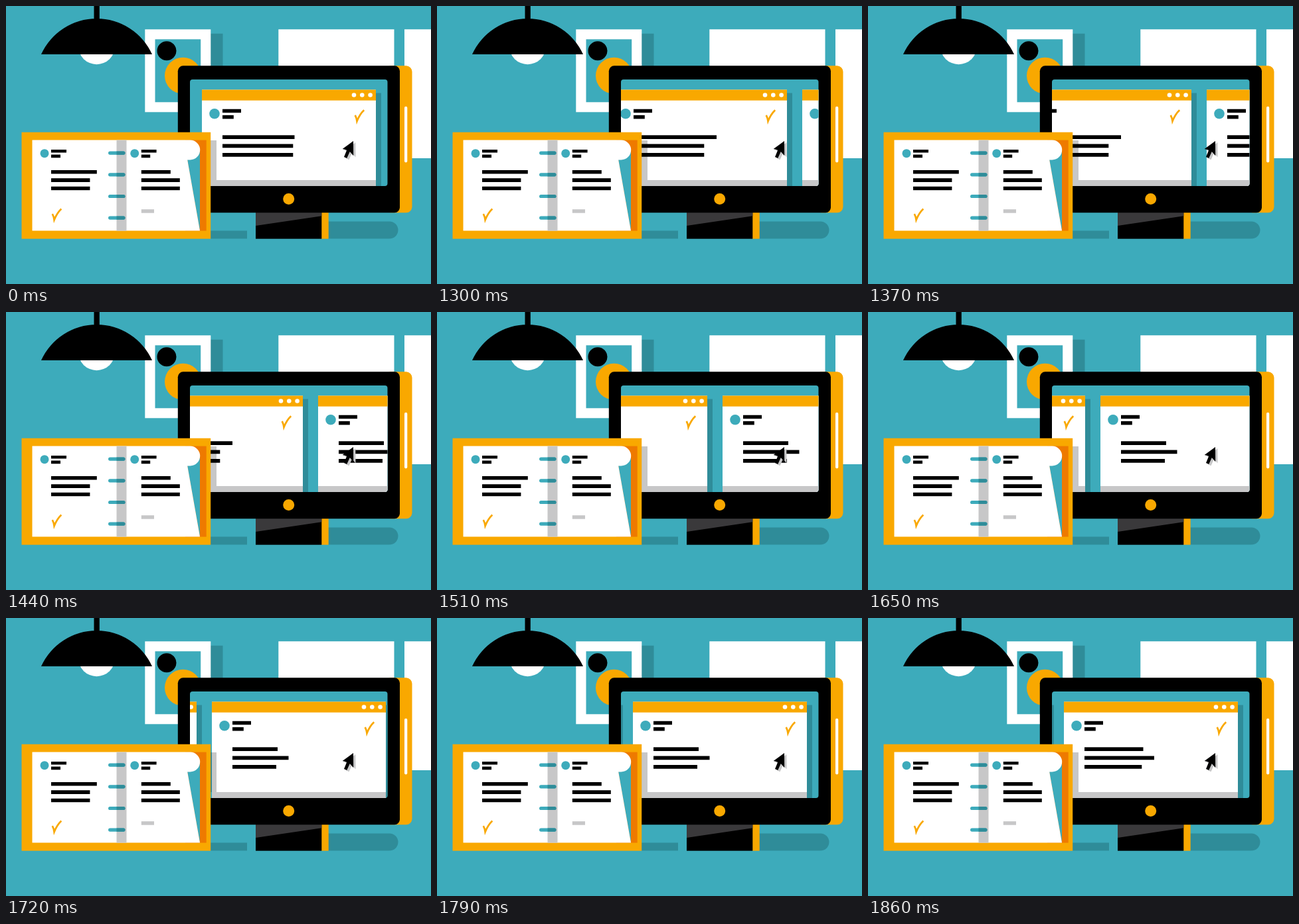
Write an HTML page that moves like this. It is 640 px wide and 420 px high and loops after 1.93 s.

```html
<!DOCTYPE html>
<html lang="en">
<head>
<meta charset="utf-8">
<title>Notebook and monitor</title>
<style>
  html, body { margin: 0; width: 100%; height: 100%; overflow: hidden; background: #3dabbb; }
  svg { display: block; width: 640px; height: 420px; }
  .teal { fill: #3dabbb; }
  .dark { fill: #2f8c99; }
  .orange { fill: #f9a800; }
  .white { fill: #fff; }
  .gray { fill: #c7c7c8; }
  .check { fill: none; stroke: #f9a800; stroke-width: 2.7; }
</style>
</head>
<body>
<svg viewBox="0 0 640 420">
  <defs>
    <clipPath id="screen"><rect x="277" y="111" width="297.5" height="161" rx="4"/></clipPath>
    <path id="check" class="check" d="M1 8.5Q3 12 3.8 17.5Q8 7 14.5 .8"/>
    <path id="arrow" d="M0 0L-16.3 12L-9.8 13.7L-14 24L-9.8 26L-5.2 16L.2 22.3Z"/>
    <g id="window">
      <rect class="dark" x="303" y="131.500" width="262" height="141"/>
      <rect class="white" x="295" y="126.500" width="262" height="146"/>
      <rect class="orange" x="295" y="126.500" width="262" height="16.200"/>
      <rect class="gray" x="295" y="263" width="262" height="9"/>
      <g class="white">
        <circle cx="524" cy="134.500" r="3.300"/>
        <circle cx="536.300" cy="134.500" r="3.300"/>
        <circle cx="548.600" cy="134.500" r="3.300"/>
      </g>
      <circle class="teal" cx="314" cy="162.700" r="7.800"/>
      <path d="M326 155.700h28v5.500h-28zM326 165h16.800v5.500h-16.800z"/>
      <use href="#check" x="524.700" y="156.500"/>
    </g>
    <g id="ring">
      <rect class="teal" x="154" width="25.500" height="5.200" rx="2.600"/>
      <path class="dark" d="M166.500 0h10.400a2.600 2.600 0 0 1 0 5.200h-10.400z"/>
    </g>
  </defs>

  <rect class="teal" width="640" height="420"/>

  <!-- wall -->
  <rect class="dark" x="308" y="41.700" width="18.500" height="60"/>
  <rect class="white" x="209.300" y="35.300" width="99" height="125"/>
  <rect class="teal" x="224.500" y="50.300" width="68.700" height="95"/>
  <circle class="orange" cx="266.500" cy="105.200" r="27.500"/>
  <circle cx="242" cy="67.700" r="14.500"/>
  <path class="white" d="M410.300 35.300h174.200V100H410.300zM600 35.300h40V230h-40z"/>

  <!-- lamp -->
  <circle class="white" cx="136.500" cy="60.700" r="27.500"/>
  <path d="M132.500 0h8.300V24h-8.300zM53 73A91.600 91.600 0 0 1 220 73Z"/>

  <!-- monitor -->
  <path class="dark" d="M308 339.500h55v12h-55zM485 325.500h92.500a13 13 0 0 1 0 26H485z"/>
  <rect class="orange" x="475" y="310" width="10.700" height="41.700"/>
  <rect x="376" y="310" width="99.300" height="41.700"/>
  <path fill="#3a393b" d="M376 312h99.300v5.300L376 332z"/>
  <rect class="orange" x="570" y="90.300" width="41.500" height="222" rx="9"/>
  <rect class="white" x="600" y="151.700" width="4.300" height="84.700" rx="2.100"/>
  <rect x="258.800" y="90.300" width="334.200" height="222" rx="8"/>
  <circle class="orange" cx="425.700" cy="291.500" r="8.500"/>

  <g clip-path="url(#screen)">
    <rect class="teal" x="277" y="111" width="298" height="161"/>
    <g id="outgoing"><use href="#window"/><path/></g>
    <g id="incoming"><use href="#window"/><path/></g>
    <rect x="308" y="203" width="9" height="60" opacity=".22"/>
    <use href="#arrow" class="gray" x="526.300" y="206.300"/>
    <use href="#arrow" x="523" y="204"/>
  </g>

  <!-- notebook -->
  <rect class="orange" x="23.500" y="190.700" width="284.700" height="161"/>
  <rect fill="#ee7a00" x="270" y="202.600" width="31.700" height="137"/>
  <path class="teal" d="M273 232L292 217V339.600z"/>
  <path class="white" d="M39.500 202.600H277.300a14.900 14.900 0 0 1 0 29.800H273.200L292 339.600H39.500z"/>
  <rect class="gray" x="166.500" y="202.600" width="15" height="137"/>
  <use href="#ring" y="219.500"/>
  <use href="#ring" y="252.200"/>
  <use href="#ring" y="284.900"/>
  <use href="#ring" y="317.500"/>
  <circle class="teal" cx="58" cy="222.700" r="6.500"/>
  <circle class="teal" cx="193.700" cy="222.700" r="6.500"/>
  <path d="M68 217h23v4.600h-23zM68 224.600h14v4.600h-14zM203.800 217h22.800v4.600h-22.800zM203.800 224.600h13.400v4.600h-13.400z"/>
  <path id="leftText"/>
  <path id="rightText"/>
  <rect class="gray" x="203.800" y="307.200" width="19.200" height="5.500"/>
  <use href="#check" x="68.800" y="305.700"/>
</svg>
<script>
  const LOOP = 1930, HOLD = 1300, STEP = 70, SPACING = 285;
  const byId = id => document.getElementById(id);

  const lines = (x, y, gap, height, widths) =>
    widths.map((w, i) => `M${x} ${y + i * gap}h${w}v${height}h${-w}z`).join('');

  function placeWindow(id, x, widths) {
    const group = byId(id);
    group.setAttribute('transform', `translate(${x})`);
    group.lastElementChild.setAttribute('d', lines(326, 195.2, 13.4, 5.7, widths));
  }

  function draw(now) {
    const time = now % LOOP;
    const step = Math.floor((time - HOLD) / STEP);
    const sliding = step >= 0;
    const shift = sliding ? Math.min(30 + 40 * step, SPACING) : 0;
    placeWindow('outgoing', -shift, [sliding ? 125 : 108.5, 106.3, 106.3]);
    placeWindow('incoming', SPACING - shift, step < 8 ? [68, 84.5, 66] : [88.5, 105, 86.3]);
  }

  byId('leftText').setAttribute('d', lines(68, 247.9, 12.4, 5.6, [68.8, 58.4, 58.4]));
  byId('rightText').setAttribute('d', lines(203.8, 247.9, 12.4, 5.6, [44, 58, 58]));

  const start = performance.now();
  function tick() {
    draw(performance.now() - start);
    requestAnimationFrame(tick);
  }
  tick();
</script>
</body>
</html>
```
